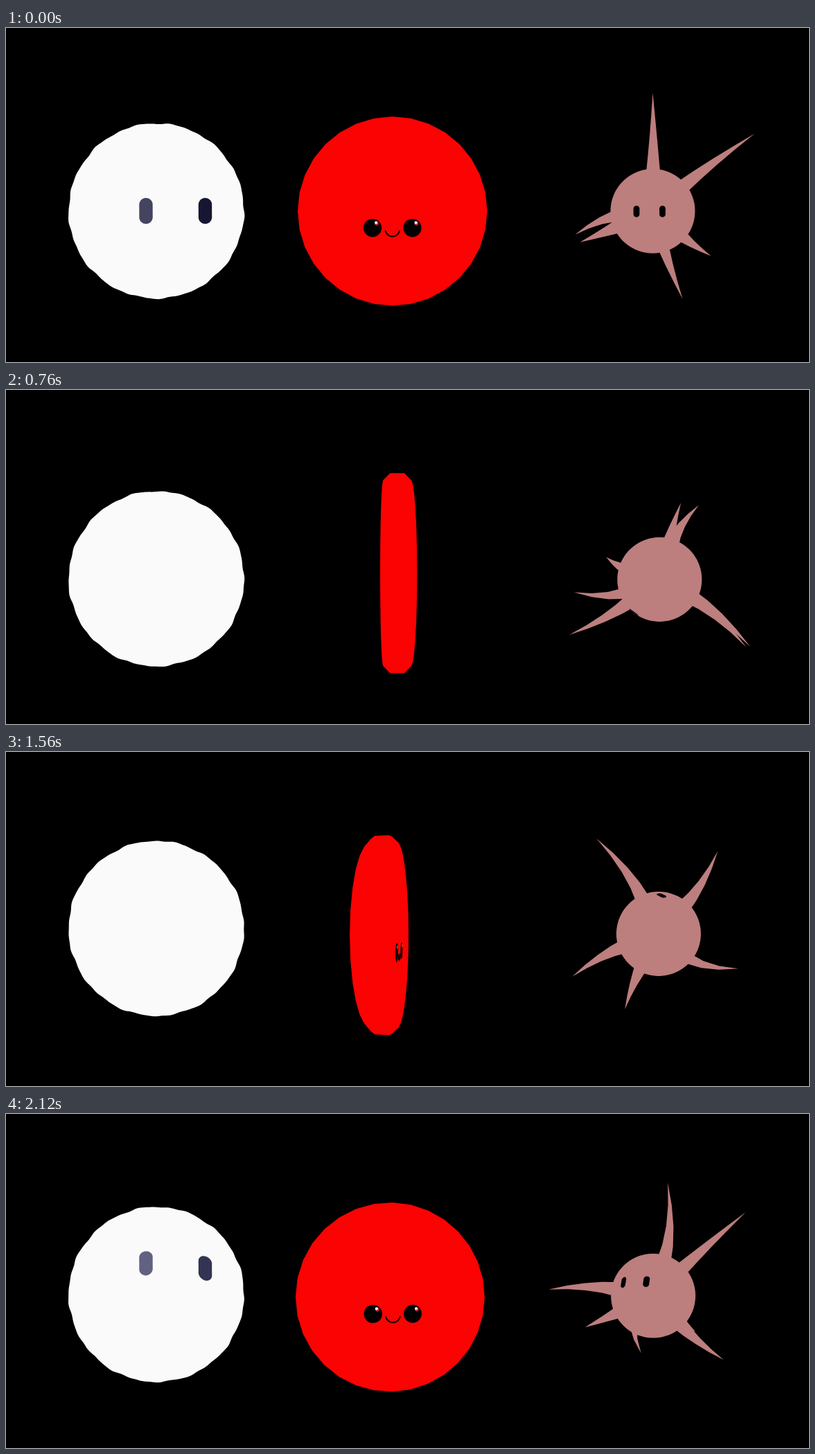
Write an HTML page with a canvas that moves like this. It is 1159 px wide and 483 px high and loops after 2.16 s.

```html
<!DOCTYPE html>
<html lang="en">
<head>
<meta charset="utf-8">
<title>Three tumbling characters</title>
<style>
  html, body { margin: 0; width: 100%; height: 100%; overflow: hidden; background: #000; }
  canvas { display: block; width: 100%; height: 100%; }
</style>
</head>
<body>
<canvas id="stage" width="1159" height="483"></canvas>
<script>
const ctx = document.getElementById('stage').getContext('2d');
const { sin, cos, asin, sqrt, hypot, PI, exp, max } = Math;
const TAU = 2 * PI, RAD = PI / 180;
const LOOP = 2160, STEP = 40, TURN = 2250;

function fillPath(points, color) {
  ctx.beginPath();
  for (const [x, y] of points) ctx.lineTo(x, y);
  ctx.closePath();
  ctx.fillStyle = color;
  ctx.fill();
}

const ring = (n, fn) => Array.from({ length: n }, (_, i) => fn(i / n * TAU));

const circle = (cx, cy, r, n = 32) => ring(n, a => [cx + r * cos(a), cy + r * sin(a)]);

const capsule = (cx, cy, w, h) => ring(40, a => [
  cx + w / 2 * cos(a + .01),
  cy + w / 2 * sin(a + .01) + Math.sign(sin(a + .01)) * (h - w) / 2
]);

// ---- White ball: rolls about the horizontal axis while bobbing ----

function drawBall(t) {
  const roll = t / TURN * TAU;
  const cx = 217, cy = 264.5 + 10 * sin(roll);
  const body = ring(240, a => {
    const bumps = .6 * sin(13 * a + 3 * roll) + .4 * sin(21 * a - 2 * roll) + .3 * sin(34 * a + roll);
    const r = 126.6 + bumps;
    return [cx + r * cos(a), cy + r * sin(a)];
  });

  const drawEyes = () => {
    const deg = ((roll / RAD + 180) % 360) - 180;
    const shine = width => exp(-(((deg + 25) / width) ** 2));
    const blue = 6 + 26 * max(0, cos((deg + 25) * RAD));
    const eye = (x, gray) => {
      const shape = capsule(x, 0, 19.5, 37.5).map(([px, py]) => {
        const r = sqrt(129 ** 2 - px * px);
        return [cx + px, cy + r * sin(roll + asin(py / r))];
      });
      fillPath(shape, `rgb(${gray},${gray},${gray + blue})`);
    };
    eye(-15, 4 + 94 * shine(40));
    eye(70.5, 4 + 48 * shine(25));
  };

  const behind = cos(roll) < 0;
  if (behind) drawEyes();
  fillPath(body, '#fafafa');
  if (!behind) drawEyes();
}

// ---- Red disc: eased spin about the vertical axis, in perspective ----

function hull(points) {
  const sorted = points.slice().sort((a, b) => a[0] - b[0] || a[1] - b[1]);
  const chain = list => {
    const out = [];
    for (const p of list) {
      while (out.length > 1) {
        const [a, b] = out.slice(-2);
        if ((b[0] - a[0]) * (p[1] - a[1]) > (b[1] - a[1]) * (p[0] - a[0])) break;
        out.pop();
      }
      out.push(p);
    }
    return out.slice(0, -1);
  };
  return [...chain(sorted), ...chain(sorted.reverse())];
}

function drawDisc(t) {
  const spin = PI * (1 - cos(PI * t / 2280));
  const c = cos(spin), s = sin(spin);
  const project = ([x, y], z) => {
    const scale = 1 / (1 - (x * s + z * c) / 390);
    return [557.8 + (x * c - z * s) * scale, 264.8 + y * scale];
  };
  const rim = (z, r) => circle(0, 0, r).map(p => project(p, z - 6));
  fillPath(hull([...rim(-18, 127), ...rim(-9, 135.7), ...rim(9, 135.7), ...rim(18, 127)]), '#fb0303');

  if (c < .05) return;
  const onFace = points => points.map(p => project(p, 10));
  for (const x of [-28, 28]) {
    fillPath(onFace(circle(x, 23.6, 12.8)), '#000');
    fillPath(onFace(circle(x + 5.8, 17.6, 2.8)), '#b32222');
    fillPath(onFace(circle(x + 5, 16.2, 2)), '#fff');
  }
  ctx.beginPath();
  for (let a = 10; a <= 170; a += 10) {
    ctx.lineTo(...project([10 * cos(a * RAD), 26.2 + 9.5 * sin(a * RAD)], 10));
  }
  ctx.lineWidth = 2;
  ctx.lineCap = 'round';
  ctx.strokeStyle = '#000';
  ctx.stroke();
}

// ---- Pink urchin: sphere with curved spikes, tumbling about two axes ----

// Spike tips relative to the sphere's centre, in its resting pose.
const spikes = [
  [0, -171, 10],
  [147, -112, 45],
  [84, 65, -90],
  [43, 127, 100],
  [-112, 34, 115],
  [-105, 45, -10],
  [18, 10, -120]
];

// Steady tilt; the turn trails behind it and catches up by the end of the loop.
function rotator(t) {
  const tilt = t / TURN * TAU;
  const trail = 50 * sin(PI * t / LOOP) + 10 * sin(tilt) - 6 * sin(2 * tilt);
  const turn = tilt - trail * RAD;
  return ([x, y, z]) => {
    const depth = z * cos(tilt) - y * sin(tilt);
    return [
      x * cos(turn) + depth * sin(turn),
      y * cos(tilt) + z * sin(tilt),
      depth * cos(turn) - x * sin(turn)
    ];
  };
}

function spikeShape(root, tip) {
  const reach = hypot(tip[0] - root[0], tip[1] - root[1]);
  const size = hypot(...root) || 1;
  const bend = root.map(v => v + v / size * reach * .45);
  const left = [], right = [];
  for (let i = 0; i <= 4; i++) {
    const u = i / 4, v = 1 - u;
    const [x, y] = [0, 1].map(k => v * v * root[k] + 2 * u * v * bend[k] + u * u * tip[k]);
    const [dx, dy] = [0, 1].map(k => v * (bend[k] - root[k]) + u * (tip[k] - bend[k]));
    const w = 10.5 * v / (hypot(dx, dy) || 1);
    left.push([x - dy * w, y + dx * w]);
    right.unshift([x + dy * w, y - dx * w]);
  }
  return [...left, ...right];
}

function drawUrchin(t) {
  const R = 61, color = '#bd7e7e';
  const rotate = rotator(t), rotateRoot = rotator(t - 60);
  ctx.save();
  ctx.translate(933.5 + 11 * sin(PI * t / LOOP), 267.5 + 6.5 * sin(t / TURN * TAU - 25 * RAD));
  for (const spike of spikes) {
    const scale = 52 / hypot(...spike);
    const root = rotateRoot(spike).slice(0, 2).map(v => v * scale);
    fillPath(spikeShape(root, rotate(spike)), color);
  }
  fillPath(circle(0, 0, R, 90), color);
  for (const x of [-23.5, 14]) {
    const onSphere = ([px, py]) => rotate([px, py, sqrt(R * R - px * px - py * py)]);
    if (onSphere([x, 0])[2] < .1 * R) continue;
    fillPath(capsule(x, .5, 8.8, 16.5).map(onSphere).filter(p => p[2] > 0), '#000');
  }
  ctx.restore();
}

function frame(now) {
  const t = Math.floor((now % LOOP) / STEP) * STEP;
  ctx.fillStyle = '#000';
  ctx.fillRect(0, 0, 1159, 483);
  drawBall(t);
  drawDisc(t);
  drawUrchin(t);
  requestAnimationFrame(() => frame(performance.now()));
}
frame(performance.now());
</script>
</body>
</html>
```
